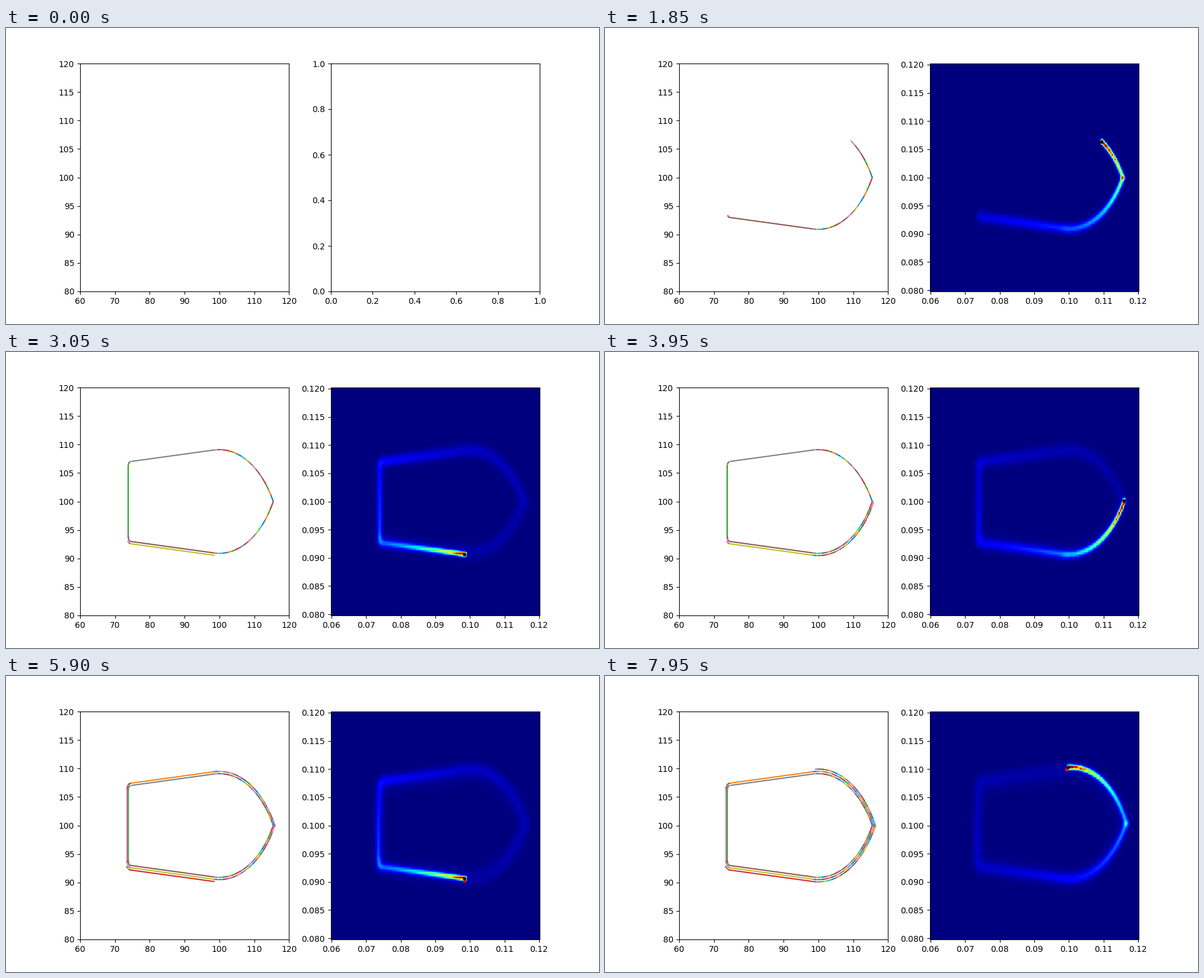
Write a matplotlib script that moves like this. It is 1000 px wide and 500 px high and loops after 8 s.

```python
import numpy as np
import matplotlib.pyplot as plt
from matplotlib.animation import FuncAnimation
from matplotlib.collections import LineCollection

FRAMES = 160
STEP = 0.25                # path length per simulation step
CELL = 0.4                 # grid spacing
DIFFUSION = 0.003
COOLING = 0.07
ALPHA = np.radians(4.8)    # slope of the long flanks
AXIS = 100
ARC_RISE = 8.6             # distance of the arc centres from the axis
TIP_RADIUS = 0.3
CORNER = np.array([74.6, 93.73])

# (first frame, first colour index, corner segments, tip segments)
LAPS = [(4, 3, 2, 6), (59, 56, 2, 7), (115, 110, 3, 7)]


def mirror(points):
    return [(x, 2 * AXIS - y) for x, y in points]


def corner(radius, start, end, count):
    return [(CORNER[0] - radius * np.cos(a), CORNER[1] - radius * np.sin(a))
            for a in np.linspace(start, end, count + 1)]


def lap_points(lap, corner_count, tip_count):
    """Vertices of one closed contour, each lap offset outwards."""
    offset = 0.4 * lap
    big = 17.7 + offset
    small = 0.75 + offset
    begin, flank = np.radians(38), np.pi / 2 - ALPHA
    end = np.arccos(ARC_RISE / (big - TIP_RADIUS))

    def flank_arc(angles):
        return [(AXIS + big * np.sin(a),
                 AXIS + ARC_RISE - big * np.cos(a)) for a in angles]

    arc = np.linspace(0, end, 16)
    lower = flank_arc(np.r_[np.linspace(-ALPHA, 0, 4), arc[1:]])
    upper = mirror(flank_arc(np.r_[arc[-2::-1], -ALPHA / 2, -ALPHA]))
    tip_x = AXIS + np.sqrt((big - TIP_RADIUS) ** 2 - ARC_RISE ** 2)
    turn = np.pi / 2 - end
    tip = [(tip_x + TIP_RADIUS * np.cos(a), AXIS + TIP_RADIUS * np.sin(a))
           for a in np.linspace(-turn, turn, tip_count + 1)[1:]]
    return np.array(corner(small, begin, flank, corner_count) + lower + tip
                    + upper + mirror(corner(small, flank, 0, 4))
                    + corner(small, 0, begin, 2))


def build_moves():
    """Map each frame to its segment and colour."""
    moves = {}
    for lap, (first, colour, corner_count, tip_count) in enumerate(LAPS):
        pts = lap_points(lap, corner_count, tip_count)
        for j, seg in enumerate(zip(pts[:-1], pts[1:])):
            if first + j < FRAMES:
                moves[first + j] = (np.array(seg), f"C{(colour + j) % 10}")
    return moves


def drifted(point, frame):
    """Position of the heat source, which drifts off the path."""
    drift = np.clip((frame - 53) / 45, 0, 1)
    side = np.clip((point[1] - AXIS) / 9, 0, 1)
    return point + drift * np.array([0.05 + 0.5 * side, 0.45])


gx, gy = np.meshgrid(60 + CELL * np.arange(151), 80 + CELL * np.arange(101))


def spot(point, size):
    return np.exp(-((gx - point[0]) ** 2 + (gy - point[1]) ** 2)
                  / (2 * size ** 2))


def cool(heat, dt):
    p = np.pad(heat, 1, mode="edge")
    lap = (p[2:, 1:-1] + p[:-2, 1:-1] + p[1:-1, 2:] + p[1:-1, :-2]
           - 4 * heat)
    heat = heat + DIFFUSION * dt / CELL ** 2 * lap
    return heat / (1 + COOLING * dt * np.sqrt(heat) / 2) ** 2


def simulate(moves):
    heat = np.zeros(gx.shape)
    fields = []
    for frame in range(FRAMES):
        if frame in moves:
            a, b = moves[frame][0]
            length = np.hypot(*(b - a))
            steps = max(1, int(np.ceil(length / STEP)))
            for t in np.arange(1, steps + 1) / steps:
                heat = cool(heat, length / steps)
                here = drifted(a + t * (b - a), frame)
                heat = np.maximum(heat, 1.25 * spot(here, 0.24))
            heat = heat + 0.35 * spot(here, 0.28)
        elif frame - 1 in moves:
            heat = cool(heat, STEP)
        fields.append(heat)
    return fields


moves = build_moves()
fields = simulate(moves)

fig, (ax_path, ax_heat) = plt.subplots(1, 2, figsize=(10, 5), dpi=100)
ax_path.set(xlim=(60, 120), ylim=(80, 120))
trail = LineCollection([], linewidths=1.5, capstyle="projecting")
ax_path.add_collection(trail)

extent = (0.0598, 0.1202, 0.0798, 0.1202)
image = ax_heat.imshow(fields[0], cmap="jet", vmin=0, vmax=1, origin="lower",
                       extent=extent, aspect="auto")
red_dot, = ax_heat.plot([], [], "r.")
black_dot, = ax_heat.plot([], [], "k.")


def update(frame):
    started = frame > 0
    image.set_visible(started)
    image.set_data(fields[frame])
    ax_heat.set_xlim(extent[:2] if started else (0, 1))
    ax_heat.set_ylim(extent[2:] if started else (0, 1))

    done = [f for f in moves if f <= frame]
    trail.set_segments([moves[f][0] for f in done])
    trail.set_color([moves[f][1] for f in done] or "none")
    if done:
        end = moves[done[-1]][0][1]
        red_dot.set_data(*(end / 1000).reshape(2, 1))
        black_dot.set_data(*(drifted(end, done[-1]) / 1000).reshape(2, 1))
    else:
        red_dot.set_data([], [])
        black_dot.set_data([], [])
    return image, trail, red_dot, black_dot


anim = FuncAnimation(fig, update, frames=FRAMES, interval=50, repeat=True,
                     repeat_delay=0, init_func=lambda: update(0))
plt.show()
```
